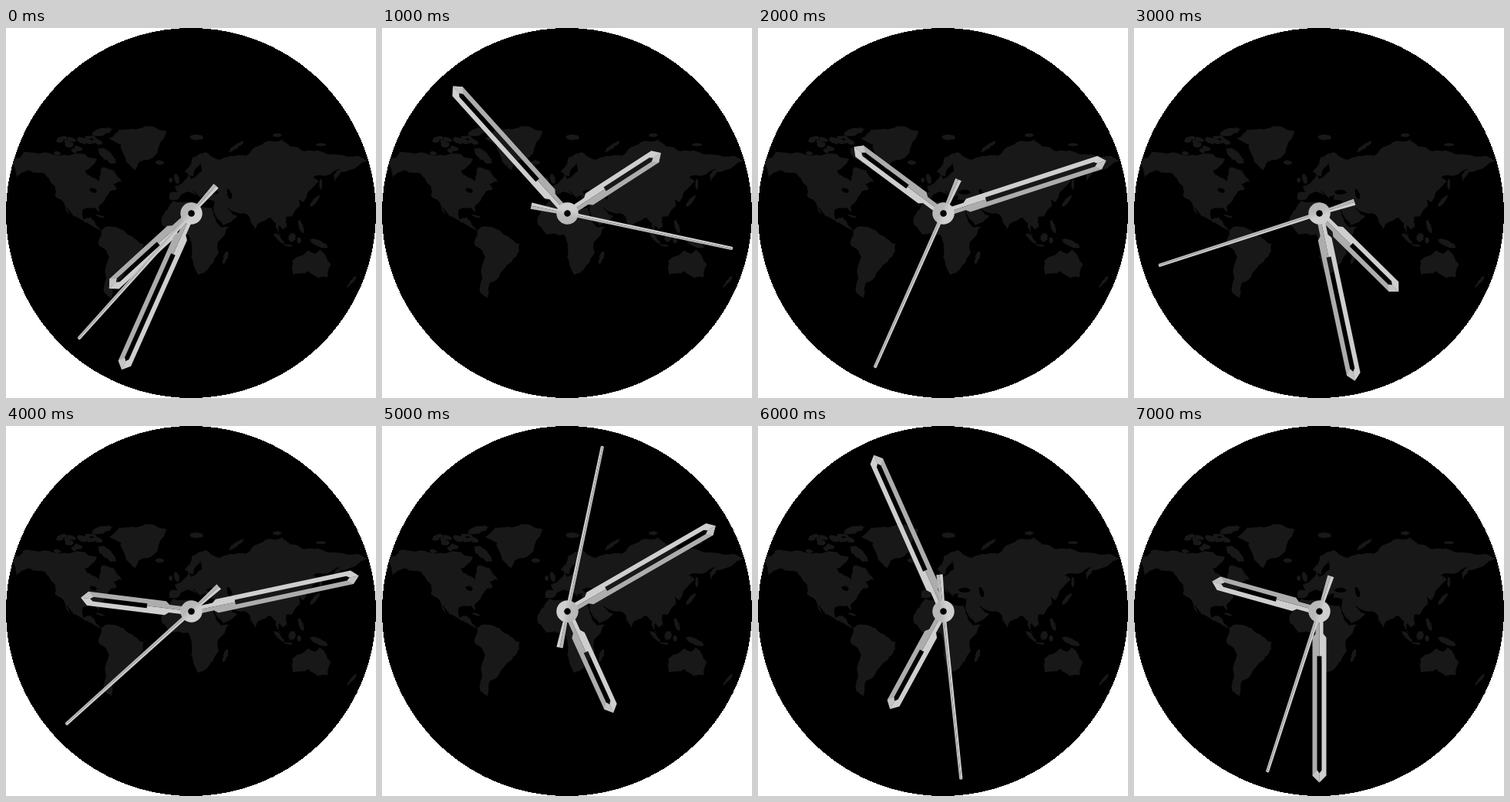
An HTML page that plays this animation: 480x480 px, repeating every 8000 ms.

```html
<!DOCTYPE html>
<html lang="en">
<head>
<meta charset="utf-8">
<title>World clock</title>
<style>
  html, body { margin: 0; width: 100%; height: 100%; overflow: hidden; background: #fff; }
  svg { display: block; width: 100%; height: 100%; }
</style>
</head>
<body>
<svg viewBox="0 0 480 480">
  <defs>
    <clipPath id="disc"><circle cx="240" cy="240" r="240"/></clipPath>
    <linearGradient id="metal">
      <stop offset=".35" stop-color="#d0d0d0"/>
      <stop offset=".65" stop-color="#b8b8b8"/>
    </linearGradient>
  </defs>
  <circle cx="240" cy="240" r="240" shape-rendering="crispEdges"/>
  <g id="map" clip-path="url(#disc)"></g>
  <g transform="translate(240.5 240.5)">
    <g id="hour"></g>
    <g id="minute"></g>
    <g id="second"></g>
  </g>
</svg>
<script>
const $ = id => document.getElementById(id);
const LAND = "#181818", SEA = "#000", LIGHT = "#cfcfcf", DARK = "#adadad";

function add(parent, tag, attrs) {
  const el = document.createElementNS("http://www.w3.org/2000/svg", tag);
  for (const k in attrs) el.setAttribute(k, attrs[k]);
  parent.appendChild(el);
}

let seed = 11;
function rand(lo, hi) {
  seed = seed * 16807 % 2147483647;
  return lo + (hi - lo) * seed / 2147483647;
}

// Miller projection
function project(lon, lat) {
  const y = 1.25 * Math.log(Math.tan(Math.PI / 4 + 0.4 * lat * Math.PI / 180));
  return [224 + 1.29 * lon, 273 - 73.9 * y];
}

// Split every edge and push its middle sideways to make a rugged coast
function roughen(pts, levels = 3) {
  if (!levels) return pts;
  const out = pts.flatMap(([x, y], i) => {
    const [u, v] = pts[(i + 1) % pts.length], k = rand(-0.12, 0.12);
    return [[x, y], [(x + u) / 2 + (v - y) * k, (y + v) / 2 - (u - x) * k]];
  });
  return roughen(out, levels - 1);
}

function coast(pts, fill) {
  const d = "M" + roughen(pts).map(p => p.map(n => n.toFixed(1))).join("L") + "Z";
  add($("map"), "path", { d, fill });
}

function land(text) {
  coast(text.trim().split(/\s+/).map(p => project(...p.split(",").map(Number))), LAND);
}

// Rugged ellipse: place in degrees, radii in pixels, tilt in degrees
function blob(lon, lat, rx, ry, tilt = 0, fill = LAND) {
  const [x, y] = project(lon, lat), t = tilt * Math.PI / 180, c = Math.cos(t), s = Math.sin(t);
  const pts = Array.from({ length: 8 }, (_, i) => {
    const a = i * Math.PI / 4, px = rx * Math.cos(a), py = ry * Math.sin(a);
    return [x + px * c - py * s, y + px * s + py * c];
  });
  coast(pts, fill);
}

// North America
land(`-168,66 -156,71 -128,70 -94,70 -82,67 -94,60 -92,57 -80,52 -77,62 -65,60 -57,52 -66,50 -62,46
  -70,43 -76,35 -81,31 -80,25 -84,30 -97,28 -96,19 -88,21 -84,15 -78,8 -94,16 -106,22 -114,31 -110,23
  -124,40 -124,48 -135,58 -151,60 -163,55 -165,62`);
// South America
land(`-78,8 -72,12 -51,4 -35,-6 -39,-18 -48,-26 -57,-38 -65,-42 -68,-54 -75,-50 -73,-37 -70,-18 -81,-5 -79,1`);
// Eurasia
land(`-9,43 -1,44 -4,48 8,54 10,57 12,54 23,59 22,65 15,56 6,59 14,68 27,71 40,66.5 46,68 68,69 73,72
  104,77.6 113,74 140,72 180,69 190,66 179,62 163,59 157,51 156,57 162,61 135,55 141,52 129,42 126,35
  120,39 122,31 114,22 108,21 109,12 105,9 100,13 103,2 98,15 92,21 80,15 77,8 72,20 66,25 52,28 48,30
  54,24 59,22 45,13 35,28 36,36 27,37 28,41 23,40 23,37 14,45 18,40 10,44 3,42 -2,37 -9,37`);
// Africa
land(`-6,36 -17,21 -17,14 -8,4 9,4 13,-9 15,-27 20,-35 35,-24 40,-15 39,-5 51,12 43,11 33,30 11,35`);
// Greenland
land(`-70,78 -60,82 -33,83.5 -12,81 -22,70 -40,65 -44,60 -53,66 -58,75`);
// Australia
land(`114,-22 130,-12 137,-15 142,-11 153,-26 150,-37 140,-38 131,-32 115,-35`);

// Arctic islands
for (let i = 0; i < 18; i++) blob(-122 + i * 2.4, rand(70, 80), rand(3, 7), rand(2, 4), rand(-30, 30));
blob(-72, 69, 15, 6, 42);
blob(-77, 81, 14, 5, -15);
// Northern seas
blob(18, 78.5, 9, 4);
blob(58, 74, 12, 2.5, -35);
blob(99, 79.5, 6, 2.5);
blob(143, 75, 7, 2);
blob(-19, 65, 6, 3);
blob(-2, 54, 3, 7, -15);
blob(-8, 53, 2.5, 3.5);
// Pacific and Indian oceans
blob(137, 36, 10, 2.5, -50);
blob(143, 50, 2, 7);
blob(123, 12, 3, 9, -20);
blob(101, 0, 10, 2.5, 45);
blob(110, -7, 6, 1.3, 8);
blob(114, 1, 5, 6, 25);
blob(121, -2, 3, 4);
blob(141, -5, 13, 4, 22);
blob(47, -19, 3, 9, 18);
blob(174, -41, 10, 2, -50);
// Caribbean
blob(-79, 22, 6, 1.3, 15);

// Inland seas and lakes
blob(34, 43.5, 8, 3, 0, SEA);
blob(51, 42, 3, 7, -15, SEA);
blob(-86, 45, 5, 3, 20, SEA);

// One half of a slotted hand; side -1 is left, 1 is right
function half(parent, len, side, fill) {
  const x = n => n * side, neck = len - 9;
  add(parent, "path", {
    fill,
    d: `M0 -8H${x(5)}V-29L${x(9)} -34V${-neck}L0 ${-len}V${12 - len}L${x(3)} ${16 - len}V-58H0Z`
  });
}

function slotted(id, len) {
  const g = $(id);
  half(g, len, -1, LIGHT);
  half(g, len, 1, DARK);
  add(g, "path", { d: `M0 ${-len}L9 ${9 - len}L3 ${16 - len}L0 ${12 - len}Z`, fill: "#c4c4c4" });
}

slotted("hour", 144.5);
slotted("minute", 222);

const sec = $("second");
for (const [side, fill] of [[-1, LIGHT], [1, "#b8b8b8"]]) {
  const x = n => n * side;
  add(sec, "path", { fill, d: `M${x(2.6)} 0L${x(2.1)} -218Q${x(1.8)} -219.5 0 -219.5V0Z` });
  add(sec, "path", { fill, d: `M${x(2.6)} 8L${x(4.2)} 48H0V8Z` });
}
add(sec, "circle", { r: 14.2, fill: "url(#metal)" });
add(sec, "circle", { r: 4.3 });

const times = ["7:34:37", "1:53:17", "10:12:34", "4:28:42", "9:13:38", "5:10:02", "6:56:29", "9:30:33"];
const turn = (id, deg) => $(id).setAttribute("transform", `rotate(${deg})`);

function draw(ms) {
  const [h, m, s] = times[Math.floor(ms / 1000) % times.length].split(":").map(Number);
  turn("hour", h * 30 + m / 2 + 0.6);
  turn("minute", m * 6);
  turn("second", s * 6);
}

const start = performance.now();
function tick() {
  draw(performance.now() - start);
  requestAnimationFrame(tick);
}
tick();
</script>
</body>
</html>
```
